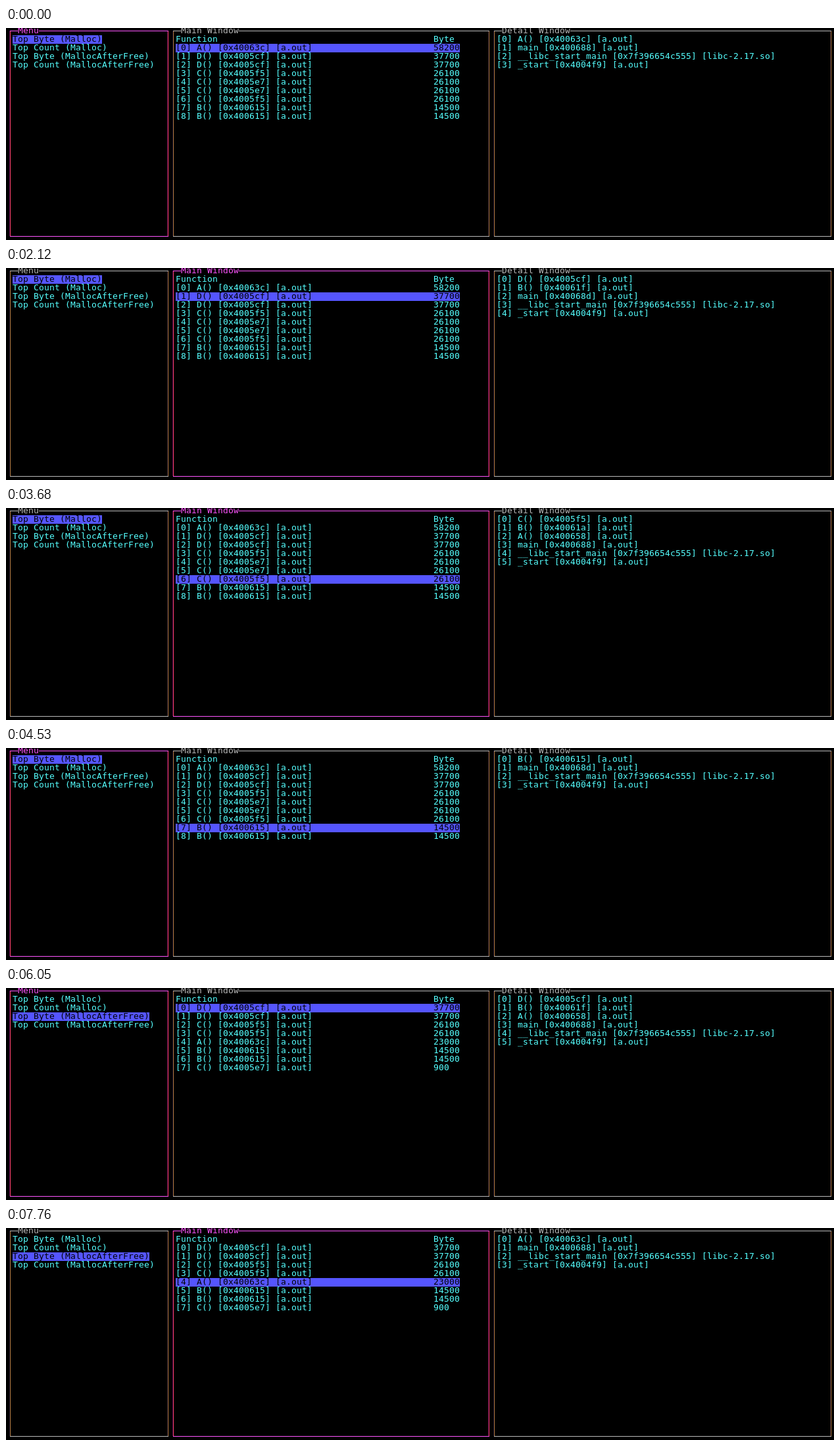
An HTML page with a canvas for the animation above (8000 ms loop, 1259 by 322 pixels).

```html
<!DOCTYPE html>
<html lang="en">
<head>
<meta charset="utf-8">
<title>Heap profiler</title>
<style>
  html, body { margin: 0; width: 100%; height: 100%; overflow: hidden; background: #000; }
  canvas { display: block; }
</style>
</head>
<body>
<canvas id="screen" width="1259" height="322"></canvas>
<script>
const ctx = document.getElementById('screen').getContext('2d', { alpha: false });
const LOOP = 8000, CELL_W = 8, CELL_H = 13, LAST_ROW = 24;
const CYAN = '#55ffff', BLUE = '#5555ff', GREY = '#bbbbbb', MAGENTA = '#ff55ff';
const colX = col => 2 + col * CELL_W;
const rowY = row => row * CELL_H - 2;

const menu = ['Top Byte (Malloc)', 'Top Count (Malloc)',
  'Top Byte (MallocAfterFree)', 'Top Count (MallocAfterFree)'];
const panes = [
  { title: 'Menu', left: 0, right: 30 },
  { title: 'Main Window', left: 31, right: 91 },
  { title: 'Detail Window', left: 92, right: 156 },
];

// Function, address and value; "+" marks a call that came through A().
const parse = text => text.split(' ').map(item => {
  const [, name, addr, viaA, value] = item.match(/(.)(...)(\+?):(\d+)/);
  return { name, addr, viaA: !!viaA, value };
});
const lists = [
  { unit: 'Byte', rows: parse('A63c:58200 D5cf:37700 D5cf+:37700 C5f5:26100 C5e7+:26100 C5e7:26100 C5f5+:26100 B615:14500 B615+:14500') },
  { unit: 'Count', rows: parse('A63c:291 C5f5:29 D5cf:29 D5cf+:29 B615:29 C5e7+:29 C5e7:29 C5f5+:29 B615+:29') },
  { unit: 'Byte', rows: parse('D5cf+:37700 D5cf:37700 C5f5:26100 C5f5+:26100 A63c:23000 B615:14500 B615+:14500 C5e7:900') },
];

// Start time, focused pane, menu entry, selected row
const steps = [
  [0, 0, 0, 0], [640, 0, 1, 0], [1380, 0, 0, 0], [1790, 1, 0, 0],
  [2120, 1, 0, 1], [2480, 1, 0, 2], [2730, 1, 0, 3], [2970, 1, 0, 4],
  [3430, 1, 0, 5], [3680, 1, 0, 6], [4060, 1, 0, 7], [4530, 0, 0, 7],
  [4910, 0, 1, 0], [6050, 0, 2, 0], [6510, 1, 2, 0], [6870, 1, 2, 1],
  [7200, 1, 2, 2], [7430, 1, 2, 3], [7760, 1, 2, 4],
];

const call = (name, addr) => `${name} [0x400${addr}] [a.out]`;
const numbered = (text, i) => `[${i}] ${text}`;

function stackOf({ name, addr, viaA }) {
  const stack = [call(name + '()', addr)];
  if (name === 'C') stack.push(call('B()', '61a'));
  if (name === 'D') stack.push(call('B()', '61f'));
  if (viaA) stack.push(call('A()', '658'));
  stack.push(call('main', viaA || name === 'A' ? '688' : '68d'),
    '__libc_start_main [0x7f396654c555] [libc-2.17.so]', call('_start', '4f9'));
  return stack.map(numbered);
}

function rect(color, x, y, w, h) {
  ctx.fillStyle = color;
  ctx.fillRect(x, y, w, h);
}

function print(text, col, row, color = CYAN) {
  ctx.fillStyle = color;
  [...text].forEach((char, i) => ctx.fillText(char, colX(col + i), rowY(row) + 10));
}

function printItem(text, col, row, selected) {
  if (selected) rect(BLUE, colX(col), rowY(row), text.length * CELL_W, CELL_H);
  print(text, col, row, selected ? '#000' : CYAN);
}

function drawPane({ title, left, right }, focused) {
  const color = focused ? MAGENTA : GREY;
  const x0 = colX(left) + 4, x1 = colX(right) + 4;
  const top = rowY(0) + 6, bottom = rowY(LAST_ROW) + 6;
  for (const x of [x0, x1]) {
    rect(focused ? '#300040' : '#000020', x - 1, top, 1, bottom - top);
    rect(focused ? '#ff4466' : '#bb8040', x, top, 1, bottom - top);
  }
  rect(color, x0, top, x1 - x0 + 1, 1);
  rect(color, x0, bottom, x1 - x0 + 1, 1);
  rect('#000', colX(left + 2), 0, title.length * CELL_W, 11);
  print(title, left + 2, 0, color);
}

function draw(now) {
  const time = now % LOOP;
  const [, focus, entry, selected] = steps.findLast(step => step[0] <= time);
  const { unit, rows } = lists[entry];
  rect('#000', 0, 0, 1259, 322);
  ctx.font = '13px "DejaVu Sans Mono", monospace';
  panes.forEach((pane, i) => drawPane(pane, i === focus));
  menu.forEach((text, i) => printItem(text, 1, i + 1, i === entry));
  print('Function'.padEnd(49) + unit, 32, 1);
  rows.forEach(({ name, addr, value }, i) => {
    const text = numbered(call(name + '()', addr), i).padEnd(49) + value;
    printItem(text, 32, i + 2, i === selected);
  });
  stackOf(rows[selected]).forEach((text, i) => print(text, 93, i + 1));
}

const start = performance.now();
function tick() {
  draw(performance.now() - start);
  requestAnimationFrame(tick);
}
tick();
</script>
</body>
</html>
```
